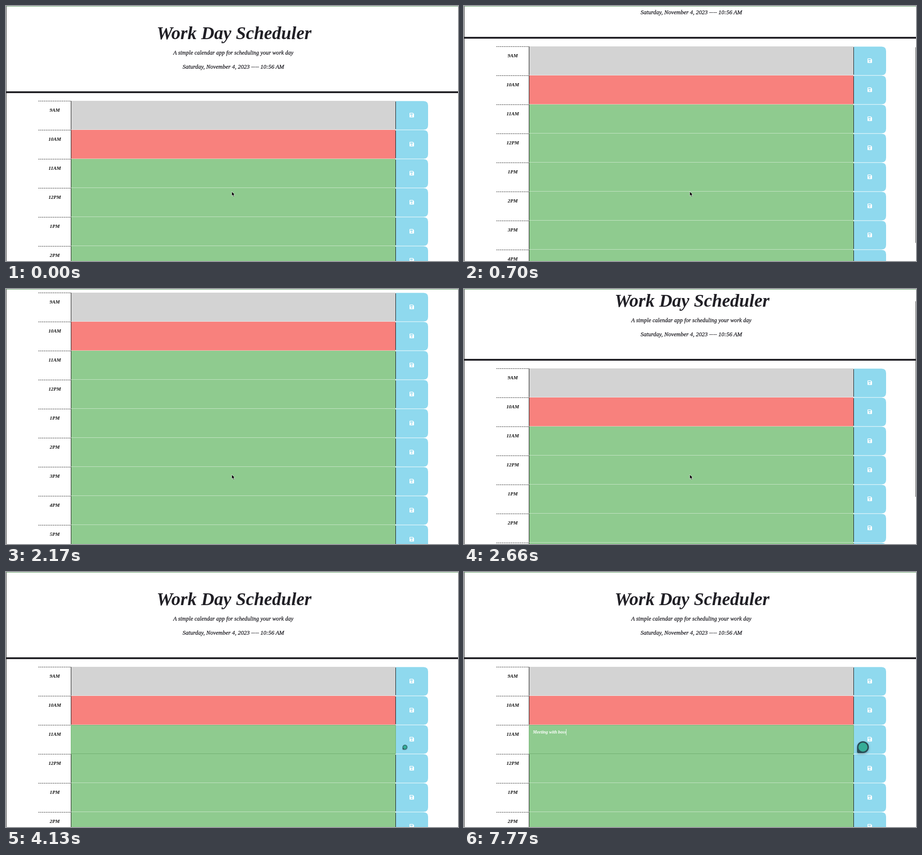
Write an HTML page that moves like this. It is 997 px wide and 562 px high and loops after 8000 ms.

```html
<!DOCTYPE html>
<html lang="en">
<head>
<meta charset="utf-8">
<title>Work Day Scheduler</title>
<style>
  html, body { margin: 0; width: 100%; height: 100%; overflow: hidden; background: #fff; }
  svg { display: block; width: 997px; height: 562px; }
  text { font-family: "Liberation Serif", "Noto Serif", serif; font-style: italic; fill: #212026; white-space: pre; }
  .mid { text-anchor: middle; }
  .title { font-size: 40px; font-weight: 700; }
  .sub { font-size: 12.6px; stroke: #212026; stroke-width: .3px; }
  .date { font-size: 13px; stroke: #212026; stroke-width: .3px; }
  .hour { font-size: 11px; font-weight: 700; fill: #111; }
  .note { font-size: 9.8px; font-weight: 700; fill: #fff; }
</style>
</head>
<body>
<svg viewBox="0 0 997 562">
  <defs>
    <path id="disk" fill="#fff" fill-rule="evenodd"
      d="M1 0H7.6L10 2.4V9Q10 10 9 10H1Q0 10 0 9V1Q0 0 1 0ZM1.6 1.6V4H7.2V1.6ZM5 5.6A1.4 1.4 0 1 0 5 8.4A1.4 1.4 0 1 0 5 5.6Z"/>
    <filter id="soft" x="-40%" y="-40%" width="180%" height="200%">
      <feDropShadow dx="0" dy="2" stdDeviation="2.5" flood-opacity=".3"/>
    </filter>
  </defs>
  <g id="page">
    <text class="mid title" x="503" y="73">Work Day Scheduler</text>
    <text class="mid sub" x="501.5" y="106.5">A simple calendar app for scheduling your work day</text>
    <text class="mid date" x="501.5" y="138">Saturday, November 4, 2023 ---- 10:56 AM</text>
    <rect x="1" y="188" width="996" height="4" fill="#222126"/>
    <g id="rows"></g>
    <rect id="focus" x="143.5" y="337.5" width="716" height="63" fill="none" stroke="#70ad70"/>
    <text id="note" class="note" x="152" y="356"></text>
    <rect id="caret" y="346" width="1" height="14" fill="#fff" opacity=".85"/>
  </g>
  <g id="helper">
    <path id="pill" fill="#2a4d54" filter="url(#soft)"/>
    <g id="bulb" fill="#35b9a4">
      <circle cx="859.5" cy="384" r="5.6"/>
      <rect x="857" y="389" width="5" height="4.5" rx="1"/>
      <path d="M859.5 380.5L860.4 383.1L863 384L860.4 384.9L859.5 387.5L858.6 384.9L856 384L858.6 383.1Z" fill="#d9f5ef"/>
    </g>
    <circle cx="880" cy="386" r="10" fill="#36ad98"/>
  </g>
  <rect id="thumb" x="996" width="1" height="431" fill="#444"/>
  <rect width="1" height="562" fill="#222"/>
  <rect width="997" height="1" fill="#5c9c62"/>
  <path id="mouse" d="M0 0V9.6L2.2 7.6L3.9 11.4L5.6 10.6L3.9 7L6.9 6.9Z" fill="#000" stroke="#fff" stroke-width=".7"/>
</svg>
<script>
const LOOP = 8000, STEP = 70;
const el = Object.fromEntries([...document.querySelectorAll('svg [id]')].map(n => [n.id, n]));

const hours = ['9AM', '10AM', '11AM', '12PM', '1PM', '2PM', '3PM', '4PM', '5PM'];
const fills = ['#d3d3d3', '#f8817d'];
el.rows.innerHTML = hours.map((hour, i) => `
  <g transform="translate(0 ${209 + 64 * i})">
    <path d="M71.5 .5H143" stroke="#222" stroke-dasharray="2.5 1.5"/>
    <text class="mid hour" x="107.5" y="24">${hour}</text>
    <rect x="144" width="715" height="63.5" fill="${fills[i] || '#8fcb8f'}"/>
    <path d="M143.5 0V63.5M859.5 1.5V62.5" stroke="#111"/>
    <path d="M860 .5H921Q931 .5 931 10.5V53.5Q931 63.5 921 63.5H860Z" fill="#8fd9ee"/>
    <use href="#disk" x="890" y="26.5"/>
  </g>`).join('');

// Tables of [time, value]
const scroll = [[0, 0], [70, 2], [210, 20], [350, 54], [490, 90], [630, 116], [700, 120],
  [840, 120], [910, 126], [1050, 158], [1190, 186], [1330, 199], [1400, 199], [1540, 202],
  [1610, 202], [1680, 203], [1890, 204], [2100, 204], [2170, 201], [2310, 172], [2450, 114],
  [2660, 34], [2800, 6], [2940, -5], [3010, -5], [3080, -3], [3150, -3], [3220, -2], [3430, 0]];
const thumbFade = [[0, 0], [70, 1], [1610, 1], [1890, 0], [2170, 0], [2240, 1], [3500, 1], [3850, 0]];
const mouseX = [[3080, 498], [3220, 444], [3430, 412], [3500, 412], [3850, 396]];
const mouseY = [[3080, 409], [3220, 383], [3430, 367], [3500, 367], [3850, 356]];
const helperSize = [[3990, 0], [4340, 1]];
const pillOpen = [[4480, 0], [4830, 1], [5320, 1], [5670, 0]];

const words = 'Meeting with boss';
const keyTimes = [5390, 5530, 5670, 5880, 5950, 6090, 6160, 6230, 6510, 6580, 6650, 6790, 6930,
  7350, 7490, 7630, 7770];

function at(table, t) {
  const i = table.findIndex(k => k[0] > t);
  if (i === 0) return table[0][1];
  if (i < 0) return table[table.length - 1][1];
  const [t0, a] = table[i - 1], [t1, b] = table[i];
  return a + (b - a) * (t - t0) / (t1 - t0);
}

const show = (node, on) => node.setAttribute('visibility', on ? 'visible' : 'hidden');

function draw(time) {
  const t = Math.floor(time / STEP) * STEP;
  const y = Math.round(at(scroll, t));
  el.page.setAttribute('transform', `translate(0 ${-y})`);
  el.thumb.setAttribute('y', 2 + Math.round(0.741 * Math.max(0, y)));
  el.thumb.setAttribute('opacity', at(thumbFade, t));

  el.mouse.setAttribute('transform', `translate(${at(mouseX, t)} ${at(mouseY, t)})`);
  show(el.mouse, t < 4130);
  show(el.focus, t >= 4060);

  const typed = keyTimes.filter(k => k <= t).length;
  el.note.textContent = words.slice(0, typed);
  const width = typed ? el.note.getComputedTextLength() : 0;
  el.caret.setAttribute('x', Math.round(152 + width));
  show(el.caret, t >= 5320 || (t >= 4270 && t < 4760));

  const size = at(helperSize, t), open = at(pillOpen, t);
  const left = 867 - 21 * open;
  el.pill.setAttribute('d',
    `M${left + 13} 373H880A13 13 0 0 1 880 399H${left + 3}Q${left} 399 ${left} 396V386A13 13 0 0 1 ${left + 13} 373Z`);
  el.bulb.setAttribute('opacity', open * open);
  el.helper.setAttribute('transform', `translate(880 386) scale(${size}) translate(-880 -386)`);
  show(el.helper, size > 0);
}

const start = performance.now();
function tick() {
  draw((performance.now() - start) % LOOP);
  requestAnimationFrame(tick);
}
tick();
</script>
</body>
</html>
```
